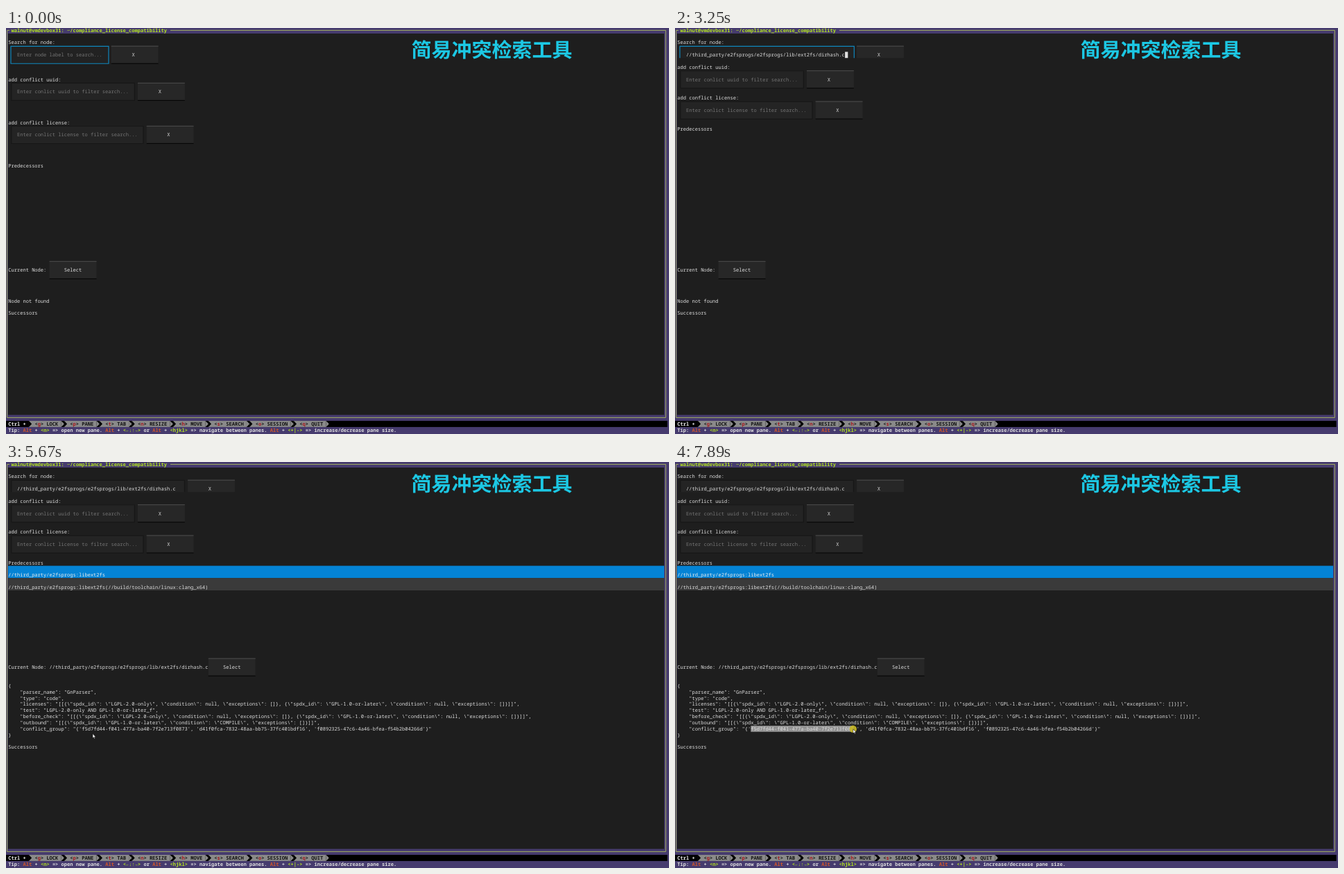
Animation, 956 px wide and 585 px high, one loop 7990 ms. Source, as an HTML page:

```html
<!DOCTYPE html>
<html lang="en">
<head>
<meta charset="utf-8">
<title>Conflict search</title>
<style>
html, body { margin: 0; width: 100%; height: 100%; overflow: hidden; background: #463b6e; }
svg { display: block; width: 956px; height: 585px; }
text { white-space: pre; text-rendering: geometricPrecision; }
.mono { font: 7.072px "Noto Sans Mono", "DejaVu Sans Mono", monospace; }
.bold { font-weight: 700; }
.title { font: 700 29px "Noto Sans CJK SC", "Noto Sans CJK", sans-serif; }
</style>
</head>
<body>
<svg viewBox="0 0 956 585" xmlns="http://www.w3.org/2000/svg">
  <g id="back"></g>
  <g id="scene"></g>
  <g id="pointer">
    <circle id="press" r="5.2" fill="#c9b81c" opacity=".85"/>
    <path d="M0 0V6.2L1.4 5L2.4 7.2L3.4 6.8L2.5 4.7H4.4Z" fill="#fff" stroke="#000" stroke-width=".5"/>
  </g>
</svg>
<script>
const LOOP = 7990, CW = 4.243, CH = 8.862;
const FG = '#dedede', BG = '#1e1e1e', PURPLE = '#463b6e', GREY = '#8a8a8a', LIME = '#b4e61e';
const PATH = '//third_party/e2fsprogs/e2fsprogs/lib/ext2fs/dirhash.c';
const JSON_LINES = String.raw`"parser_name": "GnParser",
"type": "code",
"licenses": "[[{\"spdx_id\": \"LGPL-2.0-only\", \"condition\": null, \"exceptions\": []}, {\"spdx_id\": \"GPL-1.0-or-later\", \"condition\": null, \"exceptions\": []}]]",
"test": "LGPL-2.0-only AND GPL-1.0-or-later_f",
"before_check": "[[{\"spdx_id\": \"LGPL-2.0-only\", \"condition\": null, \"exceptions\": []}, {\"spdx_id\": \"GPL-1.0-or-later\", \"condition\": null, \"exceptions\": []}]]",
"outbound": "[[{\"spdx_id\": \"GPL-1.0-or-later\", \"condition\": \"COMPILE\", \"exceptions\": []}]]",
"conflict_group": "{'f5d7fd44-f041-477a-ba40-7f2e713f0873', 'd41f0fca-7832-48aa-bb75-37fc401bdf16', 'f0892325-47c6-4a46-bfea-f54b2b04266d'}"`.split('\n');

const $ = id => document.getElementById(id);
const colX = c => c * CW - 1;
const rowY = r => r * CH - 1.1;
const esc = s => s.replace(/&/g, '&amp;').replace(/</g, '&lt;');

const rect = (x, y, w, h, fill) =>
  `<rect x="${x}" y="${y}" width="${w}" height="${h}" fill="${fill}"/>`;
const cells = (c, r, w, h, fill) => rect(colX(c), rowY(r), w * CW, h * CH, fill);
const text = (c, r, s, fill = FG, cls = '') =>
  `<text class="mono ${cls}" x="${colX(c)}" y="${rowY(r) + 6.85}" fill="${fill}">${esc(s)}</text>`;

// Text made of [string, colour] runs on one row
function runs(c, r, list) {
  let out = '';
  for (const [s, fill] of list) {
    out += text(c, r, s, fill, 'bold');
    c += s.length;
  }
  return out;
}

function wedge(c, r, fill) {
  const x = colX(c), y = rowY(r);
  return `<path d="M${x} ${y}l${CW} ${CH / 2}l${-CW} ${CH / 2}Z" fill="${fill}"/>`;
}

function button(c, r, label, rows = 3) {
  const x = colX(c), y = rowY(r), w = 16 * CW;
  return cells(c, r, 16, rows, '#272727') + rect(x, y + .2, w, 1, '#4c4c4c') +
    (rows === 3 ? rect(x, y + 3 * CH - 1.4, w, 1.2, '#060606') : '') +
    text(c + Math.floor((16 - label.length) / 2), r + 1, label);
}

function field(r, value, { fill = '#757575', size = value.length, focus = false, rows = 3 } = {}) {
  const out = focus ? .5 : -.4;
  const x = colX(2) - out, y = rowY(r) + .8;
  const right = colX(size + 6) + out, bottom = rowY(r + rows) - (rows === 3 ? .8 : 0);
  return `<path d="M${x} ${bottom}V${y}H${right}V${bottom}${rows === 3 ? 'Z' : ''}" ` +
    `fill="${focus ? '#222' : '#242424'}" stroke="${focus ? '#0f86bd' : '#171717'}" stroke-width="1.2"/>` +
    text(4, r + 1, value, fill) + button(size + 7, r, 'X', rows);
}

function drawBack() {
  let s = rect(0, 0, 956, 585, PURPLE) + rect(3, 8, 946, 549.5, BG);
  s += '<path d="M5 3.4H1.6V561.4H951.3V3.4H237" fill="none" stroke="#a3b060" stroke-width="1"/>';
  s += text(2, 0, 'walnut@vmdevbox31: ~/compliance_license_compatibility', LIME, 'bold');
  s += rect(0, rowY(64), colX(225), CH, '#000') + text(1, 64, 'Ctrl +', '#eee', 'bold');
  let c = 8;
  for (const item of 'g LOCK,p PANE,t TAB,n RESIZE,h MOVE,s SEARCH,o SESSION,q QUIT'.split(',')) {
    const [key, name] = item.split(' '), end = c + 7 + name.length;
    s += cells(c, 64, end - c, 1, GREY) + wedge(c, 64, '#000') + wedge(end, 64, GREY);
    s += runs(c + 2, 64, [['<', '#111'], [key, '#a3161c'], ['> ' + name, '#111']]);
    c = end + 1;
  }
  const alt = ['Alt', '#d2582a'], plus = [' + ', FG], key = k => [k, LIME];
  s += runs(1, 65, [['Tip: ', FG], alt, plus, key('<n>'), [' => open new pane. ', FG],
    alt, plus, key('<←↓↑→>'), [' or ', FG], alt, plus, key('<hjkl>'),
    [' => navigate between panes. ', FG], alt, plus, key('<+|->'),
    [' => increase/decrease pane size.', FG]]);
  s += '<text class="title" x="584.5" y="41.8" fill="#1cc8e4">简易冲突检索工具</text>';
  $('back').innerHTML = s;
}

// Bursts of pointer updates: start, end, steps
const BURSTS = [[180, 900, 8], [1020, 1210, 3], [1930, 2430, 6], [3950, 4650, 8],
  [4950, 5670, 8], [5770, 6080, 4], [6370, 7090, 8], [7190, 7890, 8]];
// Pointer stops: time, x, y
const STOPS = [[180, 519, 410], [900, 52, 36], [1020, 48, 36], [1210, 55, 41], [1930, 55, 41],
  [2230, 266, 49], [2430, 262, 48], [3950, 262, 48], [4350, 288, 232], [4650, 182, 160],
  [4950, 182, 160], [5450, 150, 421], [5670, 125, 391.5], [5770, 122, 390], [6080, 111.5, 383.5],
  [6370, 112, 384.5], [6570, 130, 390], [6990, 184, 389], [7190, 205, 390], [7890, 256.8, 384.8]];
// Caret toggles, starting hidden
const BLINKS = [400, 900, 1430, 1930, 2430, 2940, 3250, 3950, 4450];

function snap(t) {
  let held = 0;
  for (const [a, b, n] of BURSTS) {
    if (t < a) break;
    const step = (b - a) / (n - 1);
    held = a + step * Math.min(n - 1, Math.floor((t - a + 4) / step));
  }
  return held;
}

function pointerAt(t) {
  const i = STOPS.findIndex(p => p[0] > t);
  if (i === 0) return STOPS[0].slice(1);
  if (i < 0) return STOPS[STOPS.length - 1].slice(1);
  const [t0, x0, y0] = STOPS[i - 1], [t1, x1, y1] = STOPS[i];
  const u = (t - t0) / (t1 - t0), e = u * u * (3 - 2 * u);
  return [x0 + (x1 - x0) * e, y0 + (y1 - y0) * e];
}

function selection(t) {
  if (t < 6370) return '';
  const [x, y] = pointerAt(snap(t) - 100);
  const end = Math.ceil((x + 1) / CW), fill = '#929292';
  if (y < rowY(44)) return cells(26, 43, Math.max(1, end - 26), 1, fill);
  return cells(26, 43, 199, 1, fill) + rect(0, rowY(44), colX(end), CH, fill);
}

function scene(t) {
  const pasted = t >= 1720, compact = t >= 3250, loaded = t >= 3350, picked = t >= 4950;
  const caret = !picked && BLINKS.filter(b => t >= b).length % 2 === 1;
  const [uuidRow, licRow, predRow] = compact ? [6, 11, 16] : [8, 15, 22];
  const nodeRow = loaded ? 33 : 39;

  let s = selection(t) + text(1, 2, 'Search for node:');
  s += field(3, pasted ? PATH : 'Enter node label to search...', {
    fill: pasted ? FG : undefined, size: pasted ? PATH.length + 1 : undefined,
    focus: !picked, rows: compact ? 2 : 3
  });
  if (caret) {
    s += cells(pasted ? 4 + PATH.length : 4, 4, 1, 1, '#e0e0e0');
    if (!pasted) s += text(4, 4, 'E', '#333');
  }
  s += text(1, uuidRow, 'add conflict uuid:') +
    field(uuidRow + 1, 'Enter conlict uuid to filter search...');
  s += text(1, licRow, 'add conflict license:') +
    field(licRow + 1, 'Enter conlict license to filter search...');
  s += text(1, predRow, 'Predecessors');

  if (loaded) {
    const lib = '//third_party/e2fsprogs:libext2fs';
    s += rect(3, rowY(17), 946, 2 * CH, picked ? '#0483d5' : '#005f8c') + text(1, 18, lib, '#eee');
    s += rect(3, rowY(19), 946, 2 * CH, '#3a3a3a') +
      text(1, 20, lib + '(//build/toolchain/linux:clang_x64)');
    s += text(1, 36, '{') + text(1, 44, '}');
    JSON_LINES.forEach((line, i) => { s += text(5, 37 + i, line); });
  } else {
    s += text(1, 44, 'Node not found');
  }
  s += text(1, nodeRow, 'Current Node: ' + (loaded ? PATH : ''));
  s += button(loaded ? 69 : 15, nodeRow - 1, 'Select');
  return s + text(1, 46, 'Successors');
}

let shown = '';
function render(t) {
  const markup = scene(t);
  if (markup !== shown) $('scene').innerHTML = shown = markup;
  const [x, y] = pointerAt(snap(t));
  const hidden = t < 180 || (t >= 3040 && t < 3550);
  $('pointer').setAttribute('transform', `translate(${x} ${y})`);
  $('pointer').setAttribute('visibility', hidden ? 'hidden' : 'visible');
  $('press').setAttribute('display', t >= 6370 ? 'inline' : 'none');
}

drawBack();
const start = performance.now();
function tick() {
  render((performance.now() - start) % LOOP);
  requestAnimationFrame(tick);
}
tick();
</script>
</body>
</html>
```
